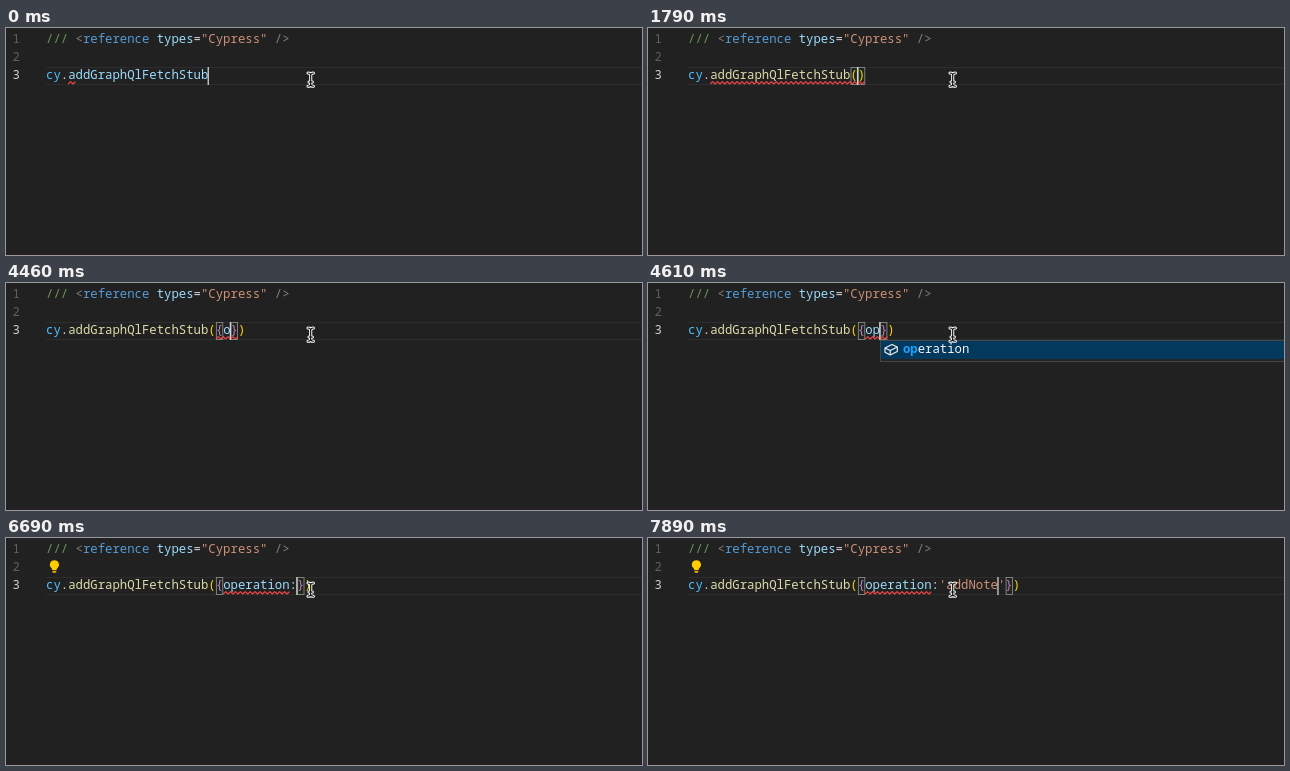
An HTML page that plays this animation: 636x227 px, repeating every 8 s.

```html
<!DOCTYPE html>
<html lang="en">
<head>
<meta charset="utf-8">
<title>Editor typing</title>
<style>
  html, body { margin: 0; width: 100%; height: 100%; overflow: hidden; background: #212121; }
  svg { display: block; width: 636px; height: 227px; }
  text { font: 500 12.31px "Noto Sans Mono", "DejaVu Sans Mono", monospace; white-space: pre; font-variant-ligatures: none; }
</style>
</head>
<body>
<svg viewBox="0 0 636 227">
  <defs>
    <path id="beam" d="M302 45q2.600 0 2.700 2V56.300q-.1 2-2.700 2M307.400 45q-2.600 0-2.700 2M304.700 56.300q.1 2 2.700 2M303 54h3.400"/>
  </defs>
  <rect width="636" height="227" fill="#212121"/>
  <rect y="225" width="636" height="2" fill="#261e20"/>
  <path d="M40 39.5H636M40 56.5H636" stroke="#2d2d2d"/>
  <g id="code"></g>
  <g id="bulb">
    <path d="M48.4 22.2a4.5 4.5 0 0 1 2.6 8.2l-.5 1.6h-4.2l-.5-1.6a4.5 4.5 0 0 1 2.6-8.2z" fill="#ffcc00"/>
    <path d="M46.4 32.7h4v1.2l-1 1.1h-2l-1-1.1z" fill="#d3a408"/>
  </g>
  <g id="popup"></g>
  <g fill="none" stroke-linecap="round" stroke-linejoin="round">
    <use href="#beam" stroke="#fff" stroke-width="3.1"/>
    <use href="#beam" stroke="#000" stroke-width="1.1"/>
  </g>
</svg>
<script>
const LOOP = 8000, LEFT = 40, CHAR = 12.31 * 0.6, ROW = 18;
const NAME = 'addGraphQlFetchStub';
const INK = {
  plain: '#d4d4d4', dim: '#808080', green: '#6a9955', blue: '#569cd6', sky: '#9cdcfe',
  object: '#4fc1ff', call: '#dcdcaa', string: '#ce9178', paren: '#ffd700', brace: '#c678c4',
  error: '#f44747', caret: '#d0d0ce', gutter: '#5f5f5f', active: '#d0d0d0', match: '#18a3ff', label: '#f4f4f4'
};

// Each step: time, then what changes. Columns count from the start of the line;
// wave = underlined columns, pair = boxed brackets, list = popup items.
const STEPS = [
  [0, { args: '', called: false, col: 22, caret: true, wave: [3, 4], pair: [], bulb: false, list: [], typed: 0 }],
  [150, { wave: null }],
  [300, { wave: [3, 22] }],
  [450, { caret: false }],
  [890, { caret: true }],
  [1040, { args: '()', col: 23, pair: [22, 23] }],
  [1490, { called: true, wave: [3, 24], caret: false }],
  [1790, { caret: true }],
  [2090, { bulb: true }],
  [2380, { caret: false }],
  [2830, { args: '({})', col: 24, caret: true, pair: [23, 24], bulb: false }],
  [2970, { col: 25, pair: [22, 25] }],
  [3270, { wave: [23, 25] }],
  [3410, { col: 24, pair: [23, 24], bulb: true }],
  [3860, { caret: false }],
  [4460, { args: '({o})', col: 25, caret: true, pair: [23, 25], bulb: false, wave: [23, 26] }],
  [4610, { args: '({op})', col: 26, pair: [23, 26], wave: [24, 27], list: ['operation'], typed: 2 }],
  [4910, { args: '({ope})', col: 27, pair: [23, 27], typed: 3 }],
  [5210, { bulb: true }],
  [5350, { args: '({operation})', col: 33, pair: [23, 33], bulb: false, list: [] }],
  [5650, { wave: [24, 33] }],
  [5800, { bulb: true }],
  [5950, { caret: false }],
  [6240, { caret: true }],
  [6540, { args: '({operation:})', col: 34, pair: [23, 34], bulb: false }],
  [6690, { bulb: true }],
  [6840, { args: "({operation:''})", col: 35, pair: [23, 36], bulb: false,
    list: ['addNote', 'deleteNote', 'getNotes', 'updateNote'], typed: 0 }],
  [7140, { bulb: true }],
  [7290, { caret: false }],
  [7590, { args: "({operation:'addNote'})", col: 42, caret: true, pair: [23, 43], bulb: false, list: [] }],
  [7890, { bulb: true }]
];

let last = {};
const states = STEPS.map(([at, change]) => (last = { ...last, ...change, at }));

const byId = id => document.getElementById(id);
const code = byId('code'), bulb = byId('bulb'), popup = byId('popup');
const colX = col => LEFT + col * CHAR;
const safe = s => s.replace(/</g, '&lt;');

// Tokens are [text, colour, weight].
function line(x, y, tokens) {
  const spans = tokens.map(([s, ink, weight = 500]) => `<tspan fill="${ink}" font-weight="${weight}">${safe(s)}</tspan>`);
  return `<text x="${x}" y="${y}">${spans.join('')}</text>`;
}

function argTokens(args) {
  const ink = s => '()'.includes(s) ? INK.paren : '{}'.includes(s) ? INK.brace
    : s[0] === "'" ? INK.string : s === ':' ? INK.plain : INK.sky;
  return (args.match(/'[^']*'|\w+|[(){}:]/g) || []).map(s => [s, ink(s)]);
}

function squiggle([from, to]) {
  const end = colX(to);
  let d = '', i = 0;
  for (let x = colX(from); x <= end; x += 2.45, i++)
    d += `${i ? 'L' : 'M'}${x.toFixed(2)} ${i % 2 ? 53.6 : 56}`;
  return `<path d="${d}" fill="none" stroke="${INK.error}" stroke-width="1.15" stroke-linejoin="round"/>`;
}

function bracketBox(col) {
  return `<rect x="${colX(col) + .5}" y="39.5" width="${CHAR - 1}" height="17" fill="#00640018" stroke="#888" stroke-width=".9"/>`;
}

const HEADER =
  ['1', '2', '3'].map((n, i) => line(6.6, 15 + i * ROW, [[n, i === 2 ? INK.active : INK.gutter]])).join('') +
  line(LEFT, 15, [['///', INK.green], [' <', INK.dim], ['reference', INK.blue], [' types', INK.sky],
    ['=', INK.plain], ['"Cypress"', INK.string], [' />', INK.dim]]);

function codeMarkup(s) {
  const tokens = [['cy', INK.object], ['.', INK.plain], [NAME, s.called ? INK.call : INK.sky], ...argTokens(s.args)];
  return HEADER + s.pair.map(bracketBox).join('') + line(LEFT, 51, tokens) +
    (s.wave ? squiggle(s.wave) : '') +
    (s.caret ? `<rect x="${colX(s.col) - .9}" y="39" width="1.3" height="18" fill="${INK.caret}"/>` : '');
}

function popupMarkup({ list, col, typed }) {
  if (!list.length) return '';
  const x = Math.round(colX(col)) + .5;
  const rows = list.map((label, i) => {
    const y = 58 + i * ROW;
    const back = i ? '' : `<rect x="${x + .5}" y="${y}" width="636" height="${ROW}" fill="#04395e"/>`;
    const cube = `<path transform="translate(${x + 10.500} ${y + 8.5})" d="M-6-1.500L1-5 6.300-2.500V2L-.8 5.500-6 2.800zM-6-1.500L-.8 1 6.300-2.500M-.8 1V5.500"
      fill="none" stroke="#f0f0f0" stroke-width="1.2" stroke-linejoin="round"/>`;
    return back + cube + line(x + 22.4, y + 12,
      [[label.slice(0, typed), INK.match, 700], [label.slice(typed), INK.label]]);
  });
  return `<rect x="${x}" y="57.5" width="660" height="${list.length * ROW + 3}" fill="#252526" stroke="#454545"/>` + rows.join('');
}

let shown = null;
function draw(time) {
  const state = states.findLast(s => s.at <= time);
  if (state === shown) return;
  shown = state;
  code.innerHTML = codeMarkup(state);
  popup.innerHTML = popupMarkup(state);
  bulb.style.display = state.bulb ? '' : 'none';
}

const start = performance.now();
function tick() {
  draw((performance.now() - start) % LOOP);
  requestAnimationFrame(tick);
}
draw(0);
requestAnimationFrame(tick);
</script>
</body>
</html>
```
